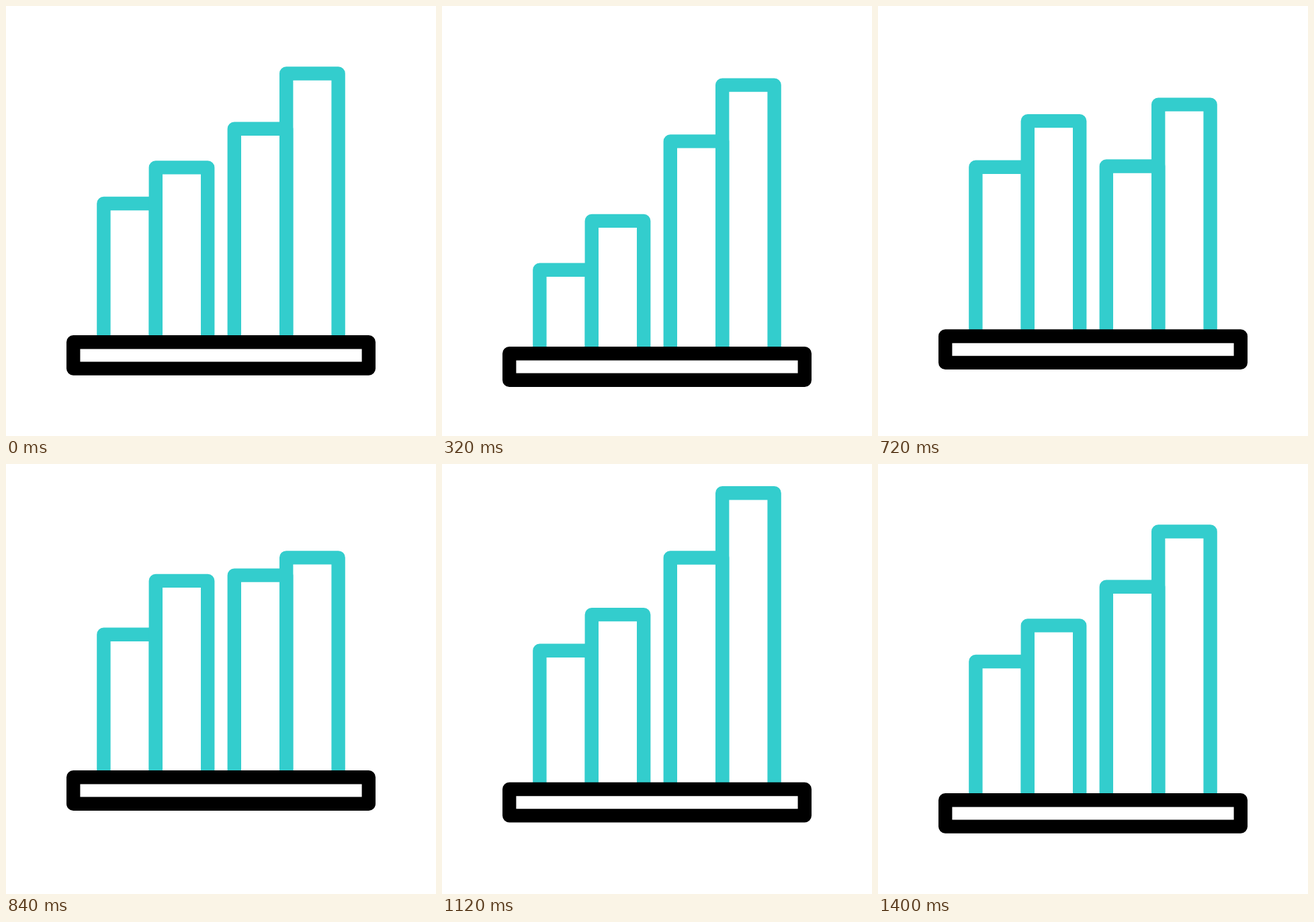
An HTML page that plays this animation: 640 by 640 pixels, repeating every 1640 ms.

```html
<!DOCTYPE html>
<html lang="en">
<head>
<meta charset="utf-8">
<title>Bar chart</title>
<style>
  html, body { margin: 0; width: 100%; height: 100%; overflow: hidden; background: #fff; }
  svg { display: block; width: 100vw; height: 100vh; }
  path, rect { fill: none; stroke-width: 20.4; stroke-linejoin: round; }
  path { stroke: #33cdcd; }
  rect { stroke: #000; }
</style>
</head>
<body>
<svg viewBox="0 0 640 640">
  <g id="chart">
    <path/><path/><path/><path/>
    <rect x="100.2" y="500.2" width="439.6" height="39.4"/>
  </g>
</svg>
<script>
  const LOOP = 1640, STEP = 40;
  const WIDTH = 77.4, LEFT = 145.4, GAP = 39.6, FLOOR = 500;
  const BEAT = 283, SLOW_BEAT = 415;

  // Each bar sinks by `down` until `low`, rises by `up` until `high`, then settles.
  const bars = [
    { top: 294, low: 325, high: 610, down: 81.7, up: 68.5 },
    { top: 240.4, low: 412, high: 705, down: 83, up: 61 },
    { top: 182.8, low: 698, high: 1002, down: 66, up: 43.3 },
    { top: 100.5, low: 855, high: 1102, down: 73, up: 41.5 }
  ];
  const sway = { low: 540, high: 860, down: 29, up: 34.6 };

  const chart = document.getElementById('chart');
  const paths = chart.querySelectorAll('path');

  function ease(t, from, to) {
    const x = Math.min(1, Math.max(0, (t - from) / (to - from)));
    return x * x * (3 - 2 * x);
  }

  function swing(t, { low, high, down, up }, sink, settle) {
    return down * ease(t, low - sink, low)
      - (down + up) * ease(t, low, high)
      + up * ease(t, high, high + settle);
  }

  function draw(t) {
    chart.setAttribute('transform', `translate(0 ${swing(t, sway, 500, 500)})`);
    bars.forEach((bar, i) => {
      const rightPair = i > 1;
      const x = LEFT + i * WIDTH + (rightPair ? GAP : 0);
      const y = bar.top + swing(t, bar, rightPair ? SLOW_BEAT : BEAT, BEAT);
      paths[i].setAttribute('d', `M${x} ${FLOOR}V${y}h${WIDTH}V${FLOOR}`);
    });
  }

  const start = performance.now();
  function tick() {
    const t = (performance.now() - start) % LOOP;
    draw(Math.floor(t / STEP) * STEP);
    requestAnimationFrame(tick);
  }
  tick();
</script>
</body>
</html>
```
